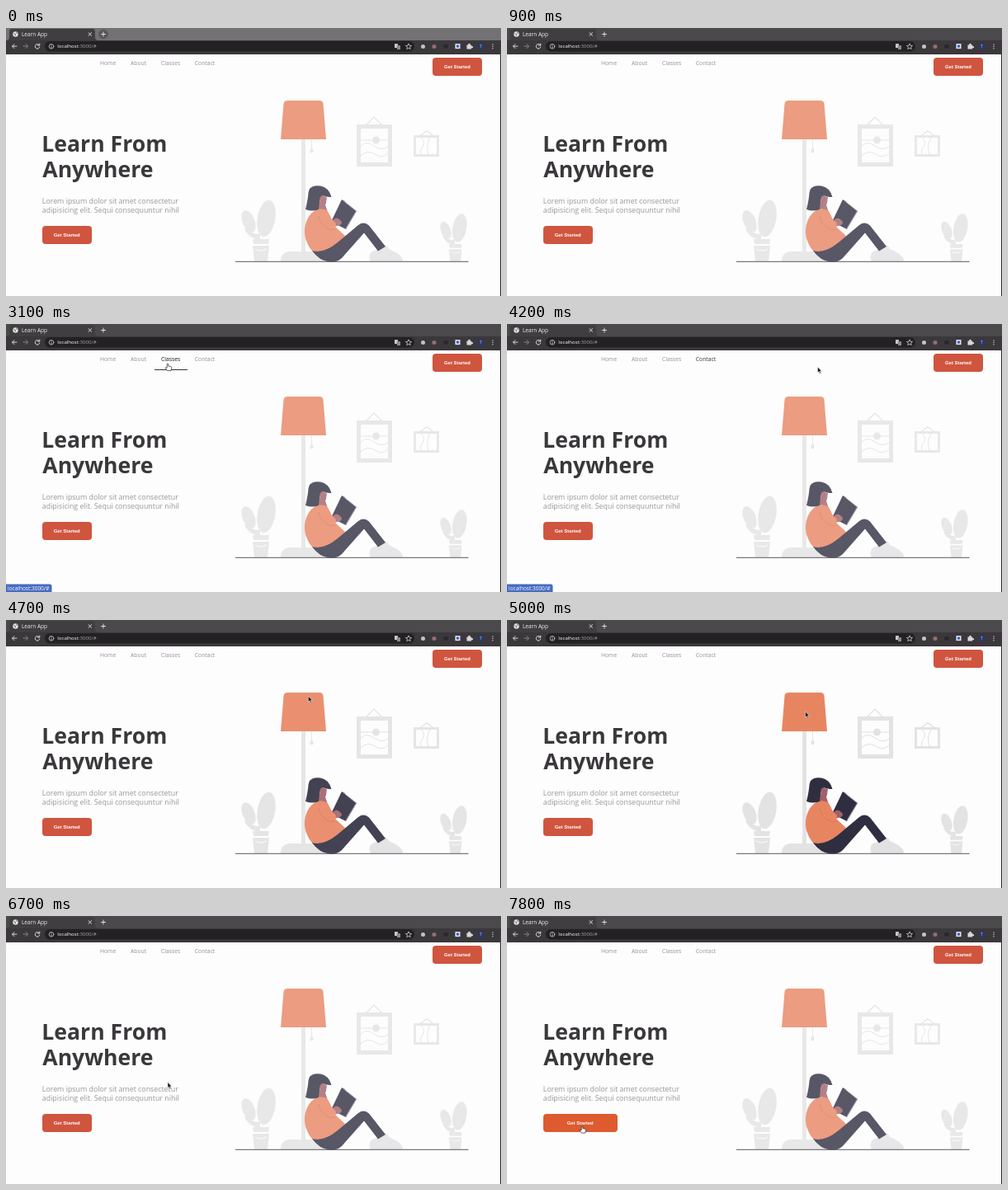
Write an HTML page that moves like this. It is 600 px wide and 325 px high and loops after 8 s.

```html
<!DOCTYPE html>
<html lang="en">
<head>
<meta charset="utf-8">
<title>Learn App</title>
<style>
  html, body { margin: 0; width: 100%; height: 100%; overflow: hidden; background: #fefdfe; }
  svg { display: block; width: 600px; height: 325px; }
  text { font-family: "Open Sans", "Noto Sans", sans-serif; white-space: pre; }
  .nav { font-size: 6.8px; fill: rgb(148,146,148); }
  .title { font-size: 26.6px; font-weight: 700; fill: #3b383c; }
  .lead { font-size: 8.85px; fill: #989698; }
  .btn { font: 700 5.95px "Liberation Sans", Arial, sans-serif; fill: #fff; text-anchor: middle; }
  .line { fill: none; stroke: #d4d2d4; stroke-width: 1; stroke-linecap: round; }
</style>
</head>
<body>
<svg viewBox="0 0 600 325">
  <defs>
    <g id="plant">
      <ellipse cx="315.500" cy="231" rx="10.800" ry="22.500" transform="rotate(10 315.5 231)"/>
      <ellipse cx="294" cy="234.500" rx="7.500" ry="14" transform="rotate(-22 294 234.5)"/>
      <path d="M292 242Q300 252 308 249V257Q295 256 289 244Z"/>
      <path d="M299 256H319L318 262H300Z"/>
      <path d="M299 264H319L317 283H301Z"/>
      <path d="M299 263.300H319M302 268Q309 272 316 268" fill="none" stroke="#fff" stroke-width="1"/>
    </g>
  </defs>

  <rect width="600" height="325" fill="#fefdfe"/>

  <!-- browser -->
  <rect width="600" height="15" fill="#4b494b"/>
  <g id="shine">
    <rect width="600" height="15" fill="#737173"/>
    <circle cx="118" cy="7.500" r="5.800" fill="#585658"/>
  </g>
  <path d="M0 15Q4 15 4 11V4Q4 1 7 1H105Q108 1 108 4V11Q108 15 112 15Z" fill="#413e41"/>
  <rect y="15" width="600" height="17" fill="#3b383b"/>
  <circle cx="11.500" cy="7.500" r="3.200" fill="#e6e4e6"/>
  <path d="M9.500 6.500L11.500 7.500L11 9.500M12.500 5L13.500 7" stroke="#5a575a" stroke-width=".9" fill="none"/>
  <text x="19" y="9.800" font-size="6.500" fill="#f1eff1">Learn App</text>
  <g class="line">
    <path d="M100 5.700L103.600 9.300M103.600 5.700L100 9.300M115.500 7.500H120.500M118 5V10" stroke="#dedcde"/>
  </g>
  <g transform="translate(0 -.4)">
    <g class="line">
      <path d="M13 22.500H7.500M10 20L7.500 22.500L10 25" stroke="#dedcde"/>
      <path d="M21 22.500H26.500M24 20L26.500 22.500L24 25" stroke="#858285"/>
      <path d="M40.300 21A2.800 2.800 0 1 0 40.800 23.500M40.800 19.500V21.500H38.500" stroke="#dedcde"/>
    </g>
    <rect x="47" y="16.500" width="448" height="12.500" rx="6.200" fill="#242124"/>
    <g class="line">
      <circle cx="55" cy="22.700" r="2.800" stroke="#d2d0d2" stroke-width=".8"/>
      <path d="M55 22.500V24.200M55 21V21.100" stroke="#d2d0d2" stroke-width=".8"/>
    </g>
    <text x="62.300" y="24.900" font-size="6.100" fill="#fff">localhost<tspan fill="#a6a3a6">:3000/#</tspan></text>
    <rect x="471" y="19.500" width="4" height="5" fill="#c9c7c9"/>
    <rect x="474" y="21.500" width="4" height="5" fill="#8c898c"/>
    <path d="M488 19.300L489 21.700L491.500 21.900L489.600 23.500L490.200 26L488 24.700L485.800 26L486.400 23.500L484.500 21.900L487 21.700Z" fill="none" stroke="#d2d0d2" stroke-width=".8"/>
    <circle cx="505.500" cy="22.800" r="2.500" fill="#c4c2c4"/>
    <circle cx="519" cy="22.800" r="2.500" fill="#94706f"/>
    <rect x="530.500" y="20.500" width="5" height="4.500" fill="#2a272a"/>
    <rect x="544.500" y="19.500" width="6" height="6" fill="#e6e6f4"/>
    <rect x="546" y="21" width="3" height="3" fill="#355bbb"/>
    <path d="M558.500 21H560.300A1.300 1.300 0 1 1 562.600 21H564V22.500A1.300 1.300 0 1 1 564 24.500V26H558.500Z" fill="#d9d7d9"/>
    <circle cx="575.500" cy="22.800" r="3.600" fill="#2c3a70"/>
    <text x="575.500" y="24.800" font-size="5.500" fill="#a9b7ee" text-anchor="middle">T</text>
    <path d="M590 20.300V20.400M590 22.700V22.800M590 25.100V25.200" class="line" style="stroke:#dedcde;stroke-width:1.300"/>
  </g>

  <!-- page -->
  <g id="menu"></g>
  <rect x="517" y="36" width="60" height="22" rx="4" fill="#d0553f"/>
  <text class="btn" x="547" y="49.200">Get Started</text>
  <text class="title" x="43.300" y="150">Learn From</text>
  <text class="title" x="44.300" y="181">Anywhere</text>
  <text class="lead" x="43.800" y="213.200">Lorem ipsum dolor sit amet consectetur</text>
  <text class="lead" x="43.800" y="223.700">adipisicing elit. Sequi consequuntur nihil</text>
  <rect id="cta" x="44" y="240" width="60" height="22" rx="4"/>
  <text id="label" class="btn" y="253.200">Get Started</text>

  <!-- illustration -->
  <g id="art">
    <g fill="#e4e3e4">
      <rect x="358" y="134" width="5" height="140"/>
      <path d="M333 283Q333 271 345 271H378Q388 271 388 283Z"/>
      <path d="M370 134H371V147H370Z"/>
      <rect x="368.500" y="146" width="4" height="5.500" rx="2"/>
      <path fill-rule="evenodd" d="M425 117H468V168H425ZM430 122V163H463V122Z"/>
      <path fill-rule="evenodd" d="M494 130H525V156H494ZM497 133V153H522V133Z"/>
      <circle cx="448.500" cy="136" r="4.500"/>
      <use href="#plant"/>
      <use href="#plant" transform="translate(303.700 62.300) scale(.78)"/>
    </g>
    <g class="line" style="stroke:#e0dfe0">
      <path d="M437 117L446 108L455 117M503 130L510 124.500L517 130" stroke-width="1.200"/>
      <path d="M430 136H463M430 143Q437 136 446 143T463 144M430 155Q438 147 447 153T463 152"/>
      <path d="M503 133Q509 138 505 144T503 153M514 133Q508 142 512 153"/>
    </g>
    <path d="M341 88H380Q384 88 384.500 92L388 135H333L336.500 92Q337 88 341 88Z" fill="#e88561"/>
    <path d="M441 281Q439 271 447 270L456 264Q462 262 464 268Q479 274 481 281Q481 283 478 283H443Q441 283 441 281Z" fill="#e2e1e3"/>
    <path d="M377 211H386L390 224L380 226Z" fill="#a0616a"/>
    <path d="M377 220C363 226 359 246 364 258C367 267 374 276 385 279L404 266L411 252L399 241L390 222Q384 218 377 220Z" fill="#e88561"/>
    <path d="M371 270Q385 274 402 260L427 239Q434 234 440 239.500L460 265L451 270.500L434 248.500L407 279Q402 284 393 284Q379 282 371 270Z" fill="#2f2e41"/>
    <path d="M368 195Q372 190 381 191.500Q391 193 394.500 205Q388 205 384.500 203L380 210L379 220Q371 223 363 220Q366 208 366.500 200Q367 197 368 195Z" fill="#2f2e41"/>
    <path d="M380 208Q381 203 384.500 203Q387 205 389 204.500L388 212Q387 217 381 216Z" fill="#a0616a"/>
    <path d="M405 212Q407 207 411 210L413 216L406 219Z" fill="#a0616a"/>
    <path d="M407 208L425 222L412 244L394 235Z" fill="#2f2e41"/>
    <path d="M409 209.500L424.500 222L412 243" fill="none" stroke="#a5a3b0" stroke-width=".8"/>
    <path d="M396 233Q401 228 405 233Q409 236 405 239L397 241Z" fill="#a0616a"/>
    <path d="M383 222Q391 221 394 231L400 237L399 244Q390 246 386 238Z" fill="#e88561"/>
    <path d="M379 228Q381 239 390 243Q395 246 399 244" fill="none" stroke="#c96d4d" stroke-width=".6"/>
  </g>
  <path d="M278 283.300H560.500" stroke="#59575d" stroke-width="1"/>
  <rect x="599" y="32" width="1" height="293" fill="#2c292c"/>

  <g id="status">
    <path d="M0 315.500H53Q55.500 315.500 55.500 318V325H0Z" fill="#466bc0"/>
    <text x="2" y="322.800" font-size="6.500" fill="#fff">localhost:3000/#</text>
  </g>

  <g id="arrow"><path d="M0 0V7L1.700 5.600L2.900 8.200L4.100 7.700L2.900 5.200H5Z" fill="#171517" stroke="#fff" stroke-width=".5"/></g>
  <g id="hand"><path d="M-.8 .6Q0 -.6 .8 .6V3L4 3.700Q5 4 4.800 5.200L4 8.600H-.6L-3 5.400Q-2.400 4.200 -.8 5.300Z" fill="#fff" stroke="#222" stroke-width=".7"/></g>
</svg>
<script>
const LOOP = 8000, STEP = 100;
const $ = id => document.getElementById(id);
const SVG = "http://www.w3.org/2000/svg";

// label, text x, line start, line end, hover on, hover off
const items = [
  ["Home", 114, 105, 141, 1300, 2000],
  ["About", 151, 141.500, 179, 2000, 2700],
  ["Classes", 188, 180, 220, 2700, 3700],
  ["Contact", 228.800, 220, 263, 3700, 4100]
];

// time, x, y of the pointer tip
const path = [
  [900, -8, 96], [1100, 60, 70], [1300, 117, 44], [1600, 124, 40],
  [1700, 124, 40], [2000, 142, 44], [2400, 160, 46], [2600, 160, 46],
  [2700, 181, 47], [3100, 196, 48], [3400, 196, 48], [3700, 224, 46],
  [4000, 256, 47], [4200, 376.500, 52], [4300, 376.500, 52.500],
  [4600, 368, 86], [5000, 361.500, 111], [5500, 361.500, 111],
  [5900, 310, 127], [6200, 240, 148], [6400, 207, 157], [6700, 196, 201.500],
  [7000, 152, 236], [7300, 111, 259], [7500, 98, 257], [7800, 91, 254.500]
];

const add = (tag, attrs) => {
  const el = document.createElementNS(SVG, tag);
  for (const k in attrs) el.setAttribute(k, attrs[k]);
  return $("menu").appendChild(el);
};

const menu = items.map(([name, x, x1, x2, on, off]) => {
  const text = add("text", { class: "nav", x, y: 45.200 });
  text.textContent = name;
  const line = add("rect", { x: x1, y: 55, width: x2 - x1, height: 1, fill: "#353235" });
  return { text, line, on, off };
});

const ramp = (t, a, b) => Math.max(0, Math.min(1, (t - a) / (b - a)));
const ease = p => p * p * (3 - 2 * p);
const mix = (a, b, p) => a + (b - a) * p;
const blend = (a, b, p) => `rgb(${a.map((v, i) => Math.round(mix(v, b[i], p)))})`;

function pointer(t) {
  const i = path.findIndex(k => k[0] >= t);
  if (i < 0) return path[path.length - 1].slice(1);
  if (i === 0) return path[0].slice(1);
  const a = path[i - 1], b = path[i], p = ramp(t, a[0], b[0]);
  return [mix(a[1], b[1], p), mix(a[2], b[2], p)];
}

function draw(t) {
  $("shine").setAttribute("opacity", 1 - ramp(t, 400, 700));

  for (const { text, line, on, off } of menu) {
    const p = ramp(t, on, on + 300) * (1 - ramp(t, off, off + 300));
    text.style.fill = blend([148, 146, 148], [25, 23, 25], ease(p));
    line.style.display = t >= on && t < off ? "" : "none";
  }
  $("status").setAttribute("opacity", ramp(t, 1300, 1500) * (1 - ramp(t, 4200, 4500)));

  const lit = ramp(t, 4500, 4900) * (1 - ramp(t, 5900, 6400));
  $("art").setAttribute("opacity", mix(.8, 1, ease(lit)));

  const grow = ease(ramp(t, 7400, 7800)), w = mix(60, 90, grow);
  $("cta").setAttribute("width", w);
  $("cta").setAttribute("fill", blend([208, 85, 63], [222, 90, 47], grow));
  $("label").setAttribute("x", 44 + w / 2 - .3);

  const [x, y] = pointer(t);
  const link = (t >= 1300 && t < 4100) || t >= 7500;
  for (const id of ["arrow", "hand"]) {
    $(id).setAttribute("transform", `translate(${x} ${y})`);
    $(id).style.display = t >= 900 && (id === "hand") === link ? "" : "none";
  }
}

const start = performance.now();
function tick() {
  const t = (performance.now() - start) % LOOP;
  draw(Math.floor(t / STEP) * STEP);
  requestAnimationFrame(tick);
}
tick();
</script>
</body>
</html>
```
